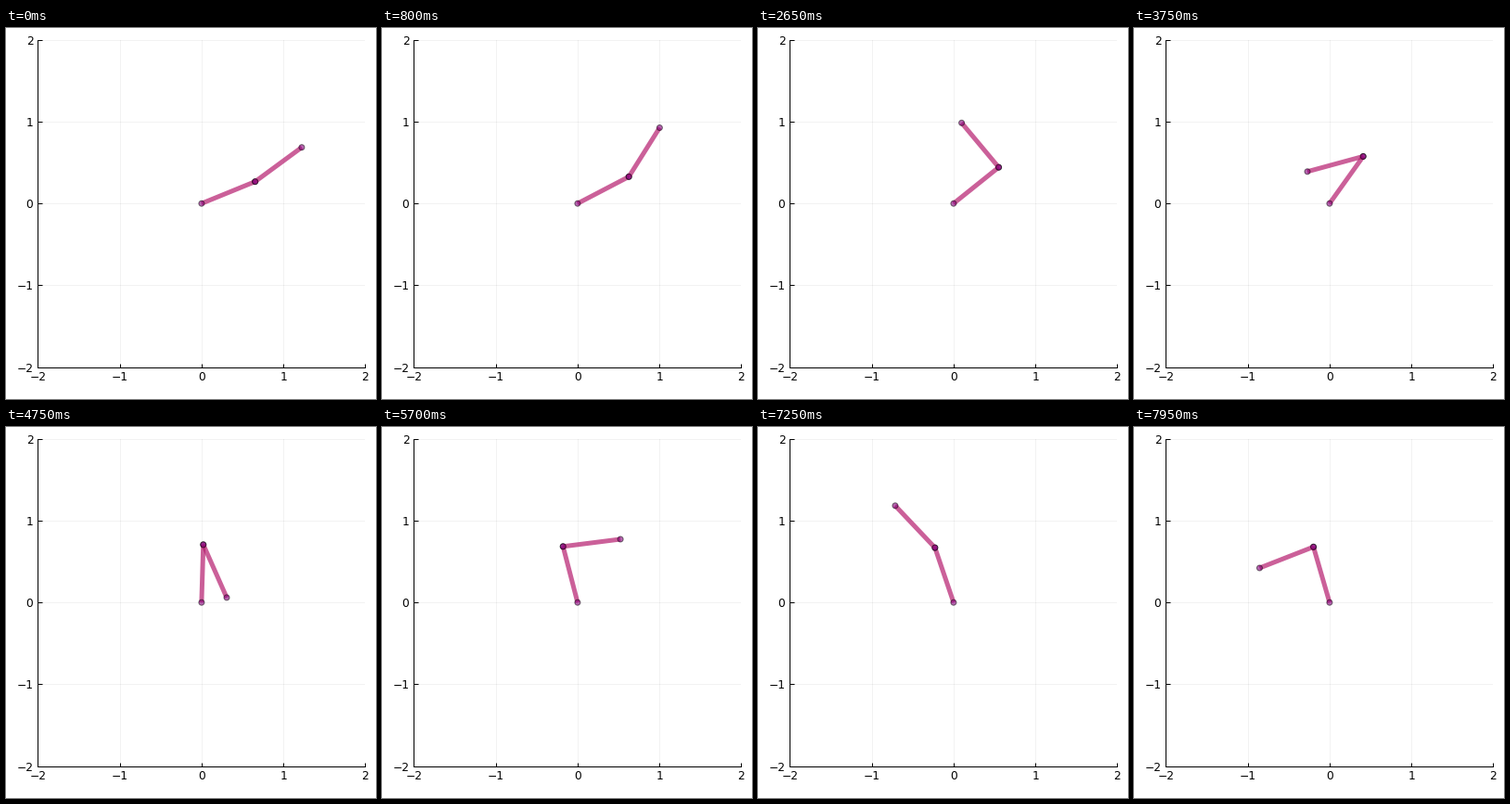
These frames come from a looping animation (399x400 px, 8000 ms). A matplotlib script:

```python
import numpy as np
import matplotlib.pyplot as plt
from matplotlib.animation import FuncAnimation
from matplotlib.patches import Circle

W, H, DPI = 399, 400, 64
PX = 72 / DPI                      # points per pixel
LEFT, RIGHT, TOP, BOTTOM = 34.45, 387.35, 12.7, 365.7
FRAMES, STEP = 160, 50
LINK = 0.707
ROD = (0.71, 0.11, 0.43, 0.7)
DOT, RIM = (0.52, 0, 0.48, 0.6), (0, 0, 0, 0.5)

# Angles of the two links in degrees, one pose per second
POSES = np.array([(22.2, 36.3), (28.8, 64), (34.2, 101.1), (42.4, 148.2),
                  (60.4, 214.9), (95.8, 318.2), (106.4, 388), (109.6, 470.3),
                  (106.5, 566), (125, 655)])
SPEEDS = np.gradient(POSES, axis=0)


def joints(t):
    """Joint positions, with the angles eased smoothly between poses."""
    i = int(t)
    s = t - i
    ease = s * s * (3 - 2 * s)
    a = np.radians((1 - ease) * POSES[i] + ease * POSES[i + 1]
                   + s * (1 - s) * ((1 - s) * SPEEDS[i] - s * SPEEDS[i + 1]))
    steps = LINK * np.column_stack((np.cos(a), np.sin(a)))
    return np.vstack(([0, 0], np.cumsum(steps, axis=0)))


plt.rcParams["font.family"] = "DejaVu Sans"
fig = plt.figure(figsize=(W / DPI, H / DPI), dpi=DPI, facecolor="white")
ax = fig.add_axes([LEFT / W, 1 - BOTTOM / H, (RIGHT - LEFT) / W,
                   (BOTTOM - TOP) / H])
ax.set(xlim=(-2, 2), ylim=(-2, 2), xticks=range(-2, 3), yticks=range(-2, 3))
ax.set_axisbelow(True)
ax.grid(color="black", alpha=0.05, linewidth=PX)
ax.spines[["top", "right"]].set_visible(False)
ax.spines[["left", "bottom"]].set_linewidth(PX)
ax.tick_params(direction="in", length=4.5 * PX, width=PX, labelsize=12.2 * PX)
ax.tick_params(axis="x", pad=4.5 * PX)
ax.tick_params(axis="y", pad=5 * PX)


def make_link(z):
    rod, = ax.plot([], [], color=ROD, lw=5 * PX, solid_capstyle="butt", zorder=z)
    dots = [ax.add_patch(Circle((0, 0), 3 / 88, facecolor=DOT, edgecolor=RIM,
                                lw=PX, zorder=z + 1)) for _ in range(2)]
    return rod, dots


links = [make_link(z) for z in (3, 5)]


def draw(frame):
    points = joints(frame * STEP / 1000)
    for i, (rod, dots) in enumerate(links):
        ends = points[i:i + 2]
        rod.set_data(*ends.T)
        for dot, end in zip(dots, ends):
            dot.center = end
    return [artist for rod, dots in links for artist in (rod, *dots)]


anim = FuncAnimation(fig, draw, frames=FRAMES, interval=STEP, repeat=True,
                     repeat_delay=0)
plt.show()
```
